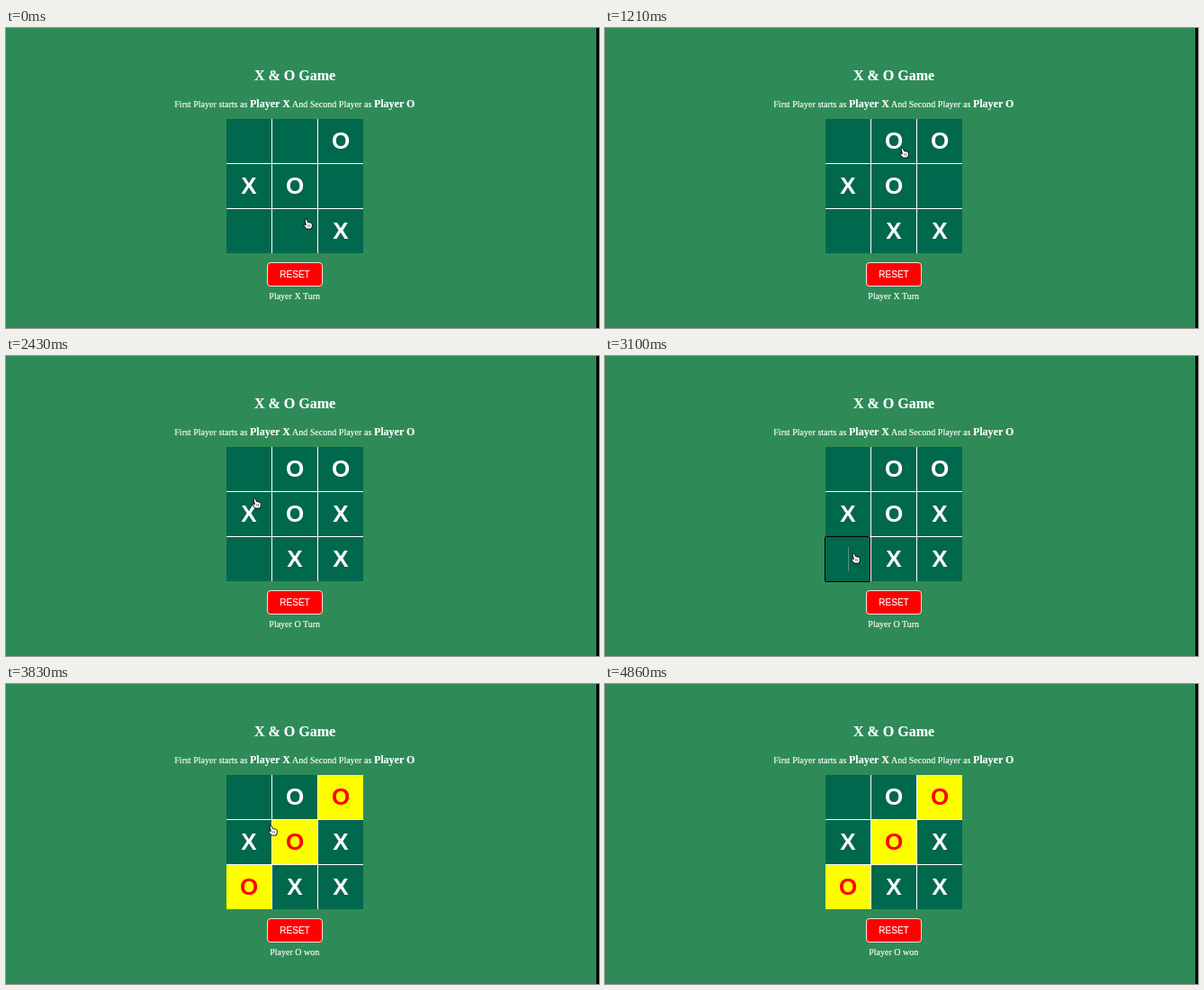
An HTML page for the animation above (4.96 s loop, 659 px wide and 333 px high).

```html
<!DOCTYPE html>
<html lang="en">
<head>
<meta charset="utf-8">
<title>X &amp; O Game</title>
<style>
html, body { margin: 0; width: 100%; height: 100%; overflow: hidden; background: #2e8b57; }
svg { display: block; width: 659px; height: 333px; }
text { fill: #fff; font: 10px "Liberation Serif", "Times New Roman", serif; white-space: pre; }
.serif { stroke: #fff; stroke-width: .15px; }
.mid { text-anchor: middle; }
.title { font-size: 16px; font-weight: bold; }
.intro { word-spacing: .1px; }
.big { font-size: 12px; font-weight: bold; }
.sans { font-family: "Liberation Sans", Arial, sans-serif; }
.mark { font-size: 26px; font-weight: bold; }
.cell { fill: #00684c; }
.won .cell { fill: #ff0; }
.won .mark { fill: #f00; }
</style>
</head>
<body>
<svg viewBox="0 0 659 333">
  <rect x="656" width="3" height="333"/>
  <text class="serif mid title" x="321" y="58">X &amp; O Game</text>
  <text class="serif intro" x="187.3" y="88">First Player starts as <tspan class="big">Player X</tspan> And Second Player as <tspan class="big">Player O</tspan></text>
  <rect x="245" y="101" width="152" height="149" fill="#fff"/>
  <g id="board"></g>
  <g id="press">
    <rect x="244.5" y="200.5" width="50" height="50" rx="1" fill="none" stroke="#000"/>
    <rect x="270" y="212" width="1" height="27" fill="#5d8f80"/>
  </g>
  <rect x="290.5" y="260.5" width="61" height="26" rx="3.5" fill="#f00" stroke="#fdd"/>
  <text class="serif mid sans" x="321" y="277">RESET</text>
  <text class="serif mid" id="status" x="320.7" y="301"></text>
  <g id="hand" stroke="#000" stroke-width=".9" stroke-linejoin="round">
    <path fill="#fff" d="M-1 .8Q0-.6 1.2.6L2.5 3.6L5.8 4.2Q7.8 5 7.4 7.5L6.4 11H1L-2 7.2Q-2.6 5.6-1 5.9L.4 6.8Z"/>
    <path fill="none" stroke-width=".6" d="M2.8 6.2v2.4M4.6 6.5v2.1"/>
  </g>
</svg>
<script>
const LOOP = 4960, PRESS = 3100, WIN = 3180;
const opening = "..OXO...X";
// X and O take turns: cell and time of each move
const plays = [[7, 310], [1, 1210], [5, 1780], [6, WIN]];
// Where the fingertip rests: arrival, departure, x, y
const stops = [[0, 870, 333, 212], [950, 1290, 330, 133], [1700, 2110, 364, 171], [2330, 2560, 276, 158],
               [3060, 3380, 276, 219], [3800, 3910, 294, 157], [4860, LOOP, 520, 350]];

const $ = id => document.getElementById(id);
$("board").innerHTML = [...opening].map((_, i) => {
  const x = 245 + i % 3 * 51, y = 101 + Math.floor(i / 3) * 50;
  return `<g><rect class="cell" x="${x}" y="${y}" width="50" height="49"/>
    <text class="mid sans mark" x="${x + 25}" y="${y + 33}"></text></g>`;
}).join("");
const cells = [...$("board").children];

function handAt(t) {
  const i = stops.findLastIndex(s => s[0] <= t);
  const [, leave, x, y] = stops[i];
  if (t <= leave) return [x, y];
  const [arrive, , nextX, nextY] = stops[i + 1];
  const k = (t - leave) / (arrive - leave), ease = k * k * (3 - 2 * k);
  return [x + (nextX - x) * ease, y + (nextY - y) * ease];
}

function draw(t) {
  const won = t >= WIN;
  const marks = [...opening];
  const played = plays.filter(([, time]) => t >= time);
  played.forEach(([cell], n) => marks[cell] = "XO"[n % 2]);
  cells.forEach((cell, i) => {
    cell.lastElementChild.textContent = marks[i].replace(".", "");
    cell.classList.toggle("won", won && [2, 4, 6].includes(i));
  });
  $("status").textContent = won ? "Player O won" : `Player ${"XO"[played.length % 2]} Turn`;
  $("press").style.display = t >= PRESS && !won ? "" : "none";
  $("hand").setAttribute("transform", `translate(${handAt(t).map(Math.round)})`);
}

function frame() {
  draw(performance.now() % LOOP);
  requestAnimationFrame(frame);
}
frame();
</script>
</body>
</html>
```
